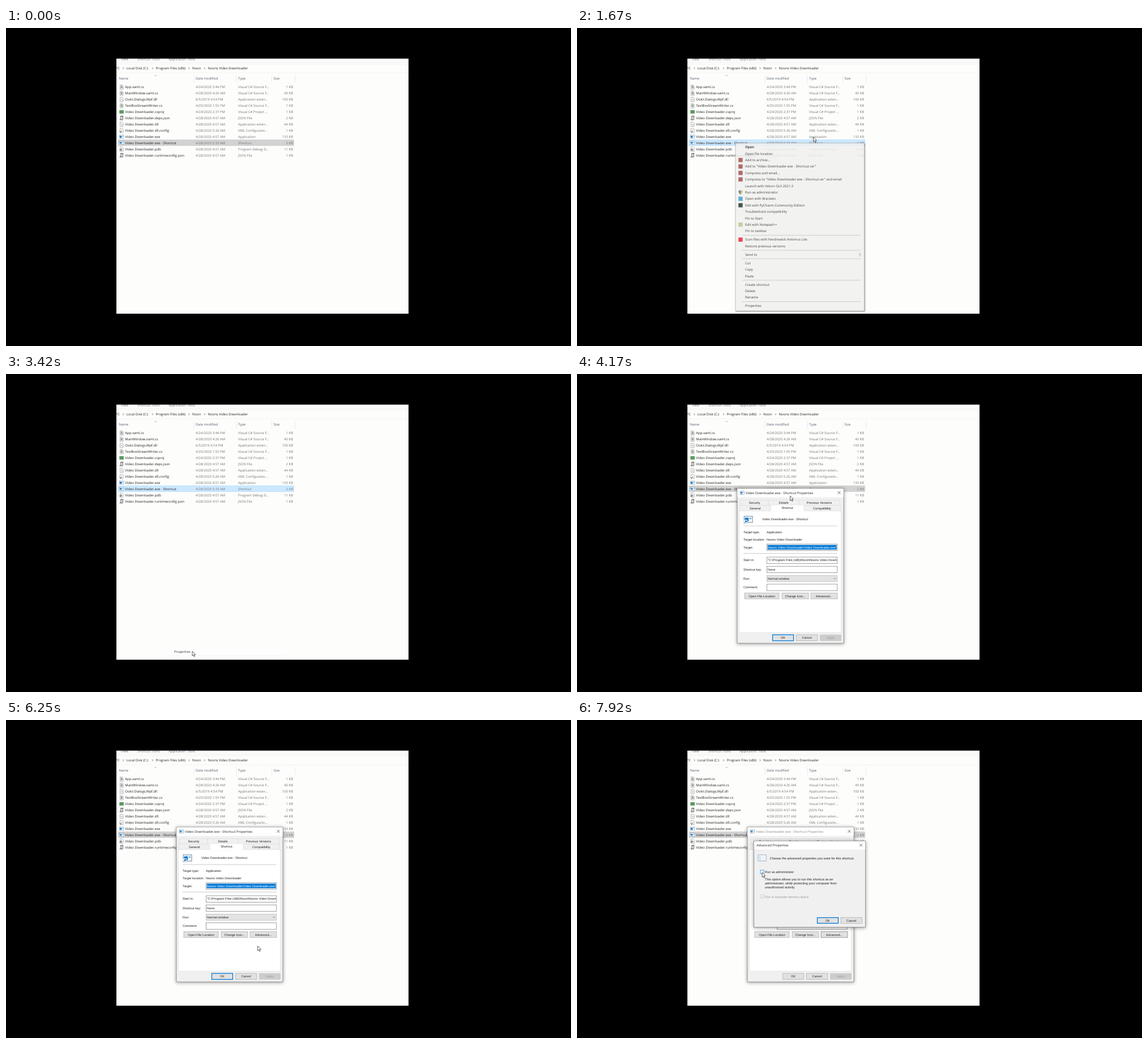
An HTML page for the animation above (8 s loop, 998 px wide and 561 px high).

```html
<!DOCTYPE html>
<html lang="en">
<head>
<meta charset="utf-8">
<title>Shortcut properties</title>
<style>
html, body { margin: 0; width: 100%; height: 100%; overflow: hidden; background: #000; }
svg { display: block; width: 100vw; height: 100vh; }
text { font: 5.95px "Open Sans", "Noto Sans", sans-serif; fill: #222; white-space: pre; text-rendering: geometricPrecision; }
.dlg text { font: 5.55px "Liberation Sans", Arial, sans-serif; }
.dlg .title { font: 5.87px "Open Sans", "Noto Sans", sans-serif; }
.dlg .body { font-size: 5.72px; }
.dim { fill: #757575; }
.head { fill: #55606e; }
.off { fill: #9a9a9a !important; }
#menu { filter: drop-shadow(1.5px 1.5px 1px rgba(0,0,0,.5)); }
.dlg { filter: drop-shadow(0 1.5px 3px rgba(0,0,0,.4)); }
</style>
</head>
<body>
<svg id="stage" viewBox="0 0 998 561" preserveAspectRatio="none"></svg>
<script>
const LOOP = 8000, FPS = 12;
const ROW_TOP = 98.8, ROW_H = 10.93, MENU_H = 11.4;

// ---- drawing helpers ----
const rect = (x, y, w, h, fill, more = '') => `<rect x="${x}" y="${y}" width="${w}" height="${h}" fill="${fill}" ${more}/>`;
const path = (d, stroke, width = .6, fill = 'none') => `<path d="${d}" stroke="${stroke}" stroke-width="${width}" fill="${fill}"/>`;
const text = (x, mid, s, more = '') => `<text x="${x}" y="${mid + 2.1}" ${more}>${s}</text>`;
const mid = (x, y, s, more = '') => text(x, y, s, `text-anchor="middle" ${more}`);
const box = (x, y, w, h, fill, stroke, width = .6, more = '') =>
  rect(x, y, w, h, fill, `stroke="${stroke}" stroke-width="${width}" ${more}`);
const button = (x, y, w, h, label, id = '') =>
  box(x, y, w, h, '#e1e1e1', '#a8a8a8', .7, id && `id="${id}"`) + mid(x + w / 2, y + h / 2, label);
const cross = (x, y) => path(`M${x - 2.5} ${y - 2.5}l5 5m0 -5l-5 5`, '#333', .7);

// ---- file icons, drawn in an 8 x 8 cell ----
const page = path('M1.5 .3h4l1.5 1.6v6h-5.5z', '#858585', .6, '#fff');
const exe = box(.3, 1.2, 7.6, 5.6, '#fff', '#7296b5', .6) + rect(1, 2.5, 3.4, 3.4, '#1879c9') + rect(5, 2.5, 2, 1.4, '#7db8e8');
const icons = {
  cs: page + path('M2.7 2.5h3M2.7 4h3M2.7 5.5h3', '#45604a', .9),
  dll: page + path('M3 3.2h2.5M3 5h2.5', '#b4b4b4', .7) + `<circle cx="4.6" cy="5" r="1.2" fill="#c8ccd0"/>`,
  proj: rect(.3, 1, 7.6, 6, '#5b9a5f'),
  json: path('M2.3 .8h5M3 .8v5.8M6.2 .8v5.8c0 1 -1 1 -1.5 .6M.6 7h4.2', '#333', .9),
  conf: page + path('M.8 5.5l1.6 1.8l2.4 -3.2', '#444', 1),
  exe,
  link: exe + box(0, 4.6, 3.2, 3.2, '#fff', '#b9c6d2', .3) + path('M.7 7.2l1.7 -1.7m-1.3 0h1.3v1.3', '#1760a8', .6),
  pdb: page + path('M1 6.2h3.4v-2.4h-2.2z', '#333', .8)
};
const icon = (name, x, y) => `<g transform="translate(${x} ${y})">${icons[name]}</g>`;

// ---- explorer window ----
const CS = 'Visual C# Source F...', EXT = 'Application exten...';
const files = [
  ['cs', 'App.xaml.cs', '4/24/2020 3:44 PM', CS, 1],
  ['cs', 'MainWindow.xaml.cs', '4/28/2020 4:26 AM', CS, 40],
  ['dll', 'Ookii.Dialogs.Wpf.dll', '6/5/2019 4:54 PM', EXT, 100],
  ['cs', 'TextBoxStreamWriter.cs', '4/25/2020 1:55 PM', CS, 1],
  ['proj', 'Video Downloader.csproj', '4/24/2020 2:37 PM', 'Visual C# Project ...', 1],
  ['json', 'Video Downloader.deps.json', '4/28/2020 4:57 AM', 'JSON File', 2],
  ['dll', 'Video Downloader.dll', '4/28/2020 4:57 AM', EXT, 44],
  ['conf', 'Video Downloader.dll.config', '4/28/2020 5:26 AM', 'XML Configuratio...', 1],
  ['exe', 'Video Downloader.exe', '4/28/2020 4:57 AM', 'Application', 133],
  ['link', 'Video Downloader.exe - Shortcut', '4/28/2020 5:33 AM', 'Shortcut', 2],
  ['pdb', 'Video Downloader.pdb', '4/28/2020 4:57 AM', 'Program Debug D...', 11],
  ['json', 'Video Downloader.runtimeconfig.json', '4/28/2020 4:57 AM', 'JSON File', 1]
];
const PICKED = 9;
const rowY = i => ROW_TOP + i * ROW_H;

function explorer() {
  let s = rect(195, 54, 516, 450, '#fdfdfc');
  s += text(203, 54.8, 'View', 'class="head"') + text(232, 54.8, 'Shortcut Tools', 'class="head"') + text(287, 54.8, 'Application Tools', 'class="head"');
  s += path('M195 60.5H711', '#e6e6e6') + path('M195 63.5H711M195 79H711', '#ececec');
  s += text(193.6, 71, 'PC');
  [[213, 'Local Disk (C:)'], [264.5, 'Program Files (x86)'], [329, 'Noon'], [356.5, 'Noons Video Downloader']]
    .forEach(([x, name]) => s += path(`M${x - 6.4} 69.4l1.6 1.6l-1.6 1.6`, '#444', .7) + text(x, 71, name));
  s += path('M262.3 84.8l2 -1.7l2 1.7', '#777');
  [[199.5, 'Name', 332], [335, 'Date modified', 407], [410, 'Type', 469.5], [472.5, 'Size', 510.5]]
    .forEach(([x, name, edge]) => s += text(x, 89.3, name, 'class="head"') + path(`M${edge} 83V96.5`, '#dedede'));
  s += rect(198, 0, 311, 10.6, '#e5f3ff', 'id="hover"');
  s += box(198.3, rowY(PICKED) - .1, 310.4, 10.5, '#d2d2d2', '#c4c4c4', .5, 'id="picked"');
  files.forEach(([kind, name, date, type, kb], i) => {
    const y = rowY(i) + 5.4;
    s += icon(kind, 200, y - 4) + text(210.3, y, name) + text(335, y, date, 'class="dim"') +
      text(410, y, type, 'class="dim"') + text(507, y, kb + ' KB', 'class="dim" text-anchor="end"');
  });
  return s;
}

// ---- context menu ----
const books = '#a0524f';
const items = [
  ['Open'], ['Open file location'], ['Add to archive...', books],
  ['Add to "Video Downloader.exe - Shortcut.rar"', books], ['Compress and email...', books],
  ['Compress to "Video Downloader.exe - Shortcut.rar" and email', books],
  ['Launch with Velorn GUI 2021.3'], ['Run as administrator', 'shield'], ['Open with Brackets', '#3f9fd0'],
  ['Edit with PyCharm Community Edition', '#24352f'], ['Troubleshoot compatibility'], ['Pin to Start'],
  ['Edit with Notepad++', '#b5c98c'], ['Pin to taskbar'], null,
  ['Scan files with Fendrowick Antivirus Lite', '#e02a35'], ['Restore previous versions'], null,
  ['Send to'], null, ['Cut'], ['Copy'], ['Paste'], null,
  ['Create shortcut'], ['Delete'], ['Rename'], null, ['Properties']
];
const itemY = [];

function menu() {
  let y = 210, rows = '';
  items.forEach(item => {
    if (!item) {
      rows += path(`M292 ${y - 3.9}H501`, '#a5a5a5', .6);
      y += 3.6;
      return;
    }
    const [label, mark] = item;
    itemY.push(y);
    if (mark === 'shield')
      rows += path(`M289 ${y - 4}q2 1.4 3.6 1.2q0 5 -3.6 6.8z`, 'none', 0, '#e5b932') + path(`M289 ${y - 4}q-2 1.4 -3.6 1.2q0 5 3.6 6.8z`, 'none', 0, '#3a6fb5');
    else if (mark) rows += rect(285.2, y - 3.6, 7.4, 7.4, mark);
    rows += text(297, y, label, label === 'Open' ? 'font-weight="700" style="font-weight:700"' : '');
    if (label === 'Send to') rows += path(`M498 ${y - 3}l3 3l-3 3`, '#444', .7);
    y += MENU_H;
  });
  return box(280, 203, 227.3, 296, '#f1f1ef', '#a6a6a6', .7) +
    rect(281.5, 0, 224.5, MENU_H, '#ffffff', 'id="itemHover"') + rows;
}

// ---- shortcut properties ----
function properties() {
  let s = box(283, 202, 188, 273, '#f0f0f0', '#777', .7) + rect(283.4, 202.4, 187.2, 15, '#fff');
  s += icon('link', 287.7, 205.5) + text(298, 209.8, 'Video Downloader.exe - Shortcut Properties', 'class="title" id="propTitle"') + cross(463, 209.4);
  [[289, 222.5, 49, 'Security'], [338, 222.5, 54, 'Details'], [392, 222.5, 72, 'Previous Versions'],
   [287, 232, 55, 'General'], [401, 232, 64, 'Compatibility']]
    .forEach(([x, y, w, name]) => s += box(x, y, w, 9.5, '#f0f0f0', '#dadada', .6) + mid(x + w / 2, y + 4.8, name));
  s += box(286.5, 241.5, 180, 214.5, '#fff', '#dcdcdc') + box(342, 231, 59, 11, '#fff', '#dcdcdc') + rect(342.4, 240.5, 58.2, 2, '#fff') + mid(371.5, 236.2, 'Shortcut');
  s += `<g transform="translate(294.6 248.6) scale(1.95)">${icons.link}</g>` + text(327, 256, 'Video Downloader.exe - Shortcut');
  s += path('M294 268H459.5M294 316.5H459.5', '#a8a8a8', .6);
  [[278.5, 'Target type:'], [292, 'Target location:'], [305.5, 'Target:'], [328.3, 'Start in:'], [344.6, 'Shortcut key:'], [360.8, 'Run:'], [375.8, 'Comment:']]
    .forEach(([y, name]) => s += text(294, y, name));
  s += text(335, 278.5, 'Application') + text(335, 292, 'Noons Video Downloader');
  [300, 323, 339.2, 370.8].forEach(y => s += box(335.3, y, 124.5, 11.4, '#fff', '#777', .7));
  s += rect(336.6, 301.6, 122, 8.2, '#0078d7');
  s += `<g clip-path="url(#field)">` +
    text(458.7, 305.5, 'Noons Video Downloader\\Video Downloader.exe"', 'text-anchor="end" style="fill:#fff"') +
    text(337, 328.3, '"C:\\Program Files (x86)\\Noon\\Noons Video Downloader"') + '</g>';
  s += text(337, 344.6, 'None') + box(335.3, 355.6, 124.5, 10.6, '#e3e3e3', '#adadad') + text(337, 360.8, 'Normal window') + path('M453.3 360l2 1.9l2 -1.9', '#555', .7);
  s += button(296, 386.2, 61, 10.6, 'Open File Location') + button(362, 386.2, 47, 10.6, 'Change Icon...') + button(413, 386.2, 47, 10.6, 'Advanced...', 'advBtn');
  s += button(345.5, 460, 37, 10.6, 'OK', 'okBtn') + button(387.3, 460, 37.5, 10.6, 'Cancel');
  return s + rect(429, 459.7, 38, 11.2, '#cccccc') + mid(448, 465.3, 'Apply', 'class="off"');
}

// ---- advanced properties ----
function advanced() {
  let s = box(312.4, 213.4, 197.2, 152.2, '#f0f0f0', '#777', .7) + rect(312.8, 213.8, 196.4, 14.6, '#fff');
  s += text(317, 221, 'Advanced Properties', 'class="title"') + cross(501.6, 220.8);
  s += box(320, 238, 14, 10.5, '#fff', '#6f8ba6', .7) + path('M322.5 241h1.6M322.5 243.4h1.6M322.5 245.8h1.6', '#2478c0', 1) + path('M326 241h5.5M326 243.4h5.5M326 245.8h5.5', '#c9d6e2', .8);
  s += text(340.5, 243.7, 'Choose the advanced properties you want for this shortcut.', 'class="body"');
  s += box(324, 265, 6, 6, '#fff', '#444', .7, 'id="check"') + text(332, 267.8, 'Run as administrator');
  ['This option allows you to run this shortcut as an', 'administrator, while protecting your computer from', 'unauthorized activity.']
    .forEach((line, i) => s += text(332, 281.2 + i * 6.7, line, 'class="body"'));
  s += box(324, 308.6, 6, 6, '#f6f6f6', '#c2c2c2') + path('M325.2 311.6l1.4 1.5l2.4 -3', '#b0b0b0', .7) + text(332, 311.8, 'Run in separate memory space', 'class="off"');
  return s + box(424.5, 348.6, 37, 10, '#e1e1e1', '#0078d7', 1.3) + mid(442.8, 353.7, 'OK') + button(466, 348.3, 37.5, 10.6, 'Cancel');
}

const stage = document.getElementById('stage');
stage.innerHTML = `<defs><clipPath id="win"><rect x="195" y="54" width="516" height="450"/></clipPath>
<clipPath id="field"><rect x="336.6" y="300" width="122.4" height="40"/></clipPath></defs>
<rect width="998" height="561"/><g clip-path="url(#win)">${explorer()}
<g id="menu">${menu()}</g>
<g id="ghost">${rect(281, 485, 212, 11.5, '#fff') + path('M281 497H493', '#ececec') + text(297, itemY[itemY.length - 1], 'Properties')}</g>
<g id="props" class="dlg">${properties()}</g><g id="adv" class="dlg">${advanced()}</g>
<g id="cursor">${path('M0 0V8.2L1.9 6.5L3.2 9.6L4.6 9L3.3 6H5.8Z', '#222', .7, '#fff')}</g></g>`;
const el = {};
stage.querySelectorAll('[id]').forEach(e => el[e.id] = e);

// ---- motion ----
const ramp = (t, a, b) => Math.min(1, Math.max(0, (t - a) / (b - a)));
const ease = (t, a, b) => { const p = ramp(t, a, b); return p * p * (3 - 2 * p); };

// pointer stops: time, x, y
const stops = [
  [80, 191, 266], [830, 280, 203], [1000, 281, 203], [1420, 417.5, 192.5], [1750, 417.5, 192.5],
  [2330, 352, 428], [2920, 329, 489], [3430, 329, 489], [4160, 376.5, 215], [4333, 373, 208],
  [4840, 391, 195], [5570, 391, 195], [6080, 438, 428], [6380, 449, 379], [7200, 449, 379],
  [7667, 334, 270], [7830, 328, 269], [7910, 327, 269]
];
function pointer(t) {
  let i = 0;
  while (i < stops.length - 2 && t >= stops[i + 1][0]) i++;
  const [a, b] = [stops[i], stops[i + 1]], p = ease(t, a[0], b[0]);
  return [a[1] + (b[1] - a[1]) * p, a[2] + (b[2] - a[2]) * p];
}

const show = (e, opacity) => {
  e.style.display = opacity > 0 ? '' : 'none';
  e.style.opacity = opacity;
};
const set = (e, attrs) => { for (const k in attrs) e.setAttribute(k, attrs[k]); };
const pop = (e, p, cx, cy, dx = 0, dy = 0) => {
  const k = .95 + .05 * p;
  show(e, p);
  set(e, { transform: `translate(${dx + cx * (1 - k)} ${dy + cy * (1 - k)}) scale(${k})` });
};

function draw(t) {
  const [x, y] = pointer(t);
  show(el.cursor, t > 40 ? 1 : 0);
  set(el.cursor, { transform: `translate(${x} ${y})` });

  const row = Math.floor((y - ROW_TOP) / ROW_H);
  show(el.hover, t > 40 && t < 1570 && row >= 0 && row < files.length && row !== PICKED ? 1 : 0);
  set(el.hover, { y: rowY(row) });
  const active = t > 900 && t < 3660;
  set(el.picked, { fill: active ? '#cce8ff' : '#d2d2d2', stroke: active ? '#99d1ff' : '#c4c4c4' });

  show(el.menu, t < 3320 ? ramp(t, 1540, 1690) : 0);
  const over = itemY.find(v => Math.abs(v - y) <= MENU_H / 2);
  show(el.itemHover, t > 1750 && over ? 1 : 0);
  if (over) set(el.itemHover, { y: over - MENU_H / 2 });
  show(el.ghost, t > 3320 ? 1 - ramp(t, 3400, 3560) : 0);

  const drag = ease(t, 4333, 4840);
  pop(el.props, ramp(t, 3620, 3810), 377, 338, 18 * drag, -13 * drag);
  const covered = t > 6800;
  el.propTitle.style.fill = covered ? '#8a8a8a' : '';
  set(el.okBtn, covered ? { stroke: '#a8a8a8', 'stroke-width': .7 } : { stroke: '#0078d7', 'stroke-width': 1.3 });
  const hot = t > 6300 && t < 6980;
  set(el.advBtn, { fill: hot ? '#e5f1fb' : '#e1e1e1', stroke: hot ? '#0078d7' : covered ? '#777' : '#a8a8a8' });

  pop(el.adv, ramp(t, 6780, 6960), 411, 289.5);
  set(el.check, { stroke: t > 7820 ? '#0078d7' : '#444' });
}

function tick(now) {
  const step = Math.floor((now % LOOP + 4) * FPS / 1000) % (LOOP * FPS / 1000);
  draw(step * 1000 / FPS);
  requestAnimationFrame(tick);
}
draw(0);
requestAnimationFrame(tick);
</script>
</body>
</html>
```
